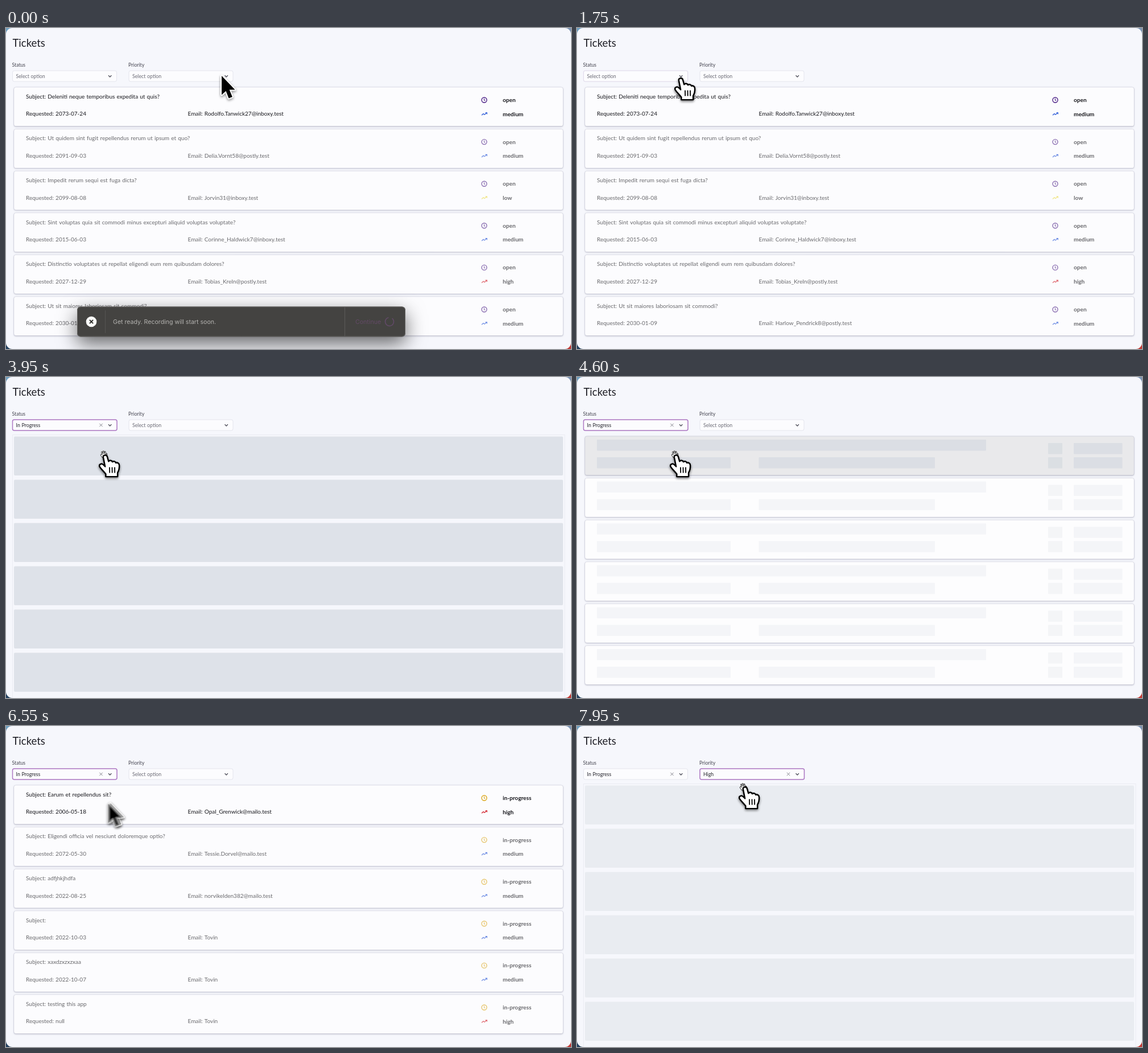
These frames come from a looping animation (993x564 px, 8000 ms). An HTML page with a canvas:

```html
<!DOCTYPE html>
<html lang="en">
<head>
<meta charset="utf-8">
<title>Tickets</title>
<style>
html, body { margin: 0; width: 100%; height: 100%; overflow: hidden; background: #f6f7fc; }
canvas { display: block; width: 993px; height: 564px; }
</style>
</head>
<body>
<canvas id="stage"></canvas>
<script>
const W = 993, H = 564, LOOP = 8000;
const canvas = document.getElementById('stage');
const ctx = canvas.getContext('2d');
const dpr = window.devicePixelRatio || 1;
canvas.width = W * dpr;
canvas.height = H * dpr;

const SANS = 'Lato, "Open Sans", sans-serif';
const COLORS = {
  open: '#4b1f86', 'in-progress': '#dba71c',
  low: '#ead94a', medium: '#2d5bd8', high: '#d2232e'
};
const OPEN_ROWS = [
  ['Deleniti neque temporibus expedita ut quis?', '2073-07-24', 'Rodolfo.Tanwick27@inboxy.test', 'open', 'medium'],
  ['Ut quidem sint fugit repellendus rerum ut ipsum et quo?', '2091-09-03', 'Delia.Vornt58@postly.test', 'open', 'medium'],
  ['Impedit rerum sequi est fuga dicta?', '2099-08-08', 'Jorvin31@inboxy.test', 'open', 'low'],
  ['Sint voluptas quia sit commodi minus excepturi aliquid voluptas voluptate?', '2015-06-03', 'Corinne_Haldwick7@inboxy.test', 'open', 'medium'],
  ['Distinctio voluptates ut repellat eligendi eum rem quibusdam dolores?', '2027-12-29', 'Tobias_Kreln@postly.test', 'open', 'high'],
  ['Ut sit maiores laboriosam sit commodi?', '2030-01-09', 'Harlow_Pendrick8@postly.test', 'open', 'medium']
];
const PROGRESS_ROWS = [
  ['Earum et repellendus sit?', '2006-05-18', 'Opal_Grenwick@mailo.test', 'in-progress', 'high'],
  ['Eligendi officia vel nesciunt doloremque optio?', '2072-05-30', 'Tessie.Dorvel@mailo.test', 'in-progress', 'medium'],
  ['adfjhkjhdfa', '2022-08-25', 'norvikelden382@mailo.test', 'in-progress', 'medium'],
  ['', '2022-10-03', 'Tovin', 'in-progress', 'medium'],
  ['xaxdzxzxzxaa', '2022-10-07', 'Tovin', 'in-progress', 'medium'],
  ['testing this app', 'null', 'Tovin', 'in-progress', 'high']
];

// Moments of the scene, in ms
const T = {
  focus1: 1740, menu1: 1850, pick1: 3430, load1: 3640, skeleton: 4450, data: 5200,
  focus2: 7030, menu2: 7090, pick2: 7640, load2: 7770
};
const MOVES = [
  [500, 1150, 182, 89], [2450, 2950, 174, 135], [3200, 3400, 174, 138],
  [6450, 6900, 387, 87], [7220, 7560, 295, 108]
];

const clamp = v => Math.max(0, Math.min(1, v));
const ramp = (t, from, to) => clamp((t - from) / (to - from));
const ease = p => p < .5 ? 4 * p ** 3 : 1 - (2 - 2 * p) ** 3 / 2;

function text(str, x, y, size, color, weight = 400, family = SANS) {
  ctx.font = `${weight} ${size}px ${family}`;
  ctx.wordSpacing = family === SANS ? size * .06 + 'px' : '0px';
  ctx.fillStyle = color;
  ctx.fillText(str, x, y);
}

function box(x, y, w, h, r, fill, stroke, width = 1) {
  ctx.beginPath();
  ctx.roundRect(x, y, w, h, r);
  if (fill) { ctx.fillStyle = fill; ctx.fill(); }
  if (stroke) { ctx.strokeStyle = stroke; ctx.lineWidth = width; ctx.stroke(); }
}

function line(points, color, width) {
  ctx.beginPath();
  points.forEach(([x, y]) => ctx.lineTo(x, y));
  ctx.strokeStyle = color;
  ctx.lineWidth = width;
  ctx.stroke();
}

function ring(x, y, r, color, width, from = 0, to = 2 * Math.PI) {
  ctx.beginPath();
  ctx.arc(x, y, r, from, to);
  ctx.strokeStyle = color;
  ctx.lineWidth = width;
  ctx.stroke();
}

function cross(x, y, r, color, width) {
  line([[x - r, y - r], [x + r, y + r]], color, width);
  line([[x + r, y - r], [x - r, y + r]], color, width);
}

function shadow(color, blur, dy, draw) {
  ctx.save();
  ctx.shadowColor = color;
  ctx.shadowBlur = blur * dpr;
  ctx.shadowOffsetY = dy * dpr;
  draw();
  ctx.restore();
}

function faded(alpha, draw) {
  ctx.save();
  ctx.globalAlpha *= alpha;
  draw();
  ctx.restore();
}

function backdrop() {
  [['#6f9fc0', 0, 0], ['#7d95b5', W - 14, 0], ['#24415f', 0, H - 14], ['#c23a35', W - 14, H - 14]]
    .forEach(([color, x, y]) => { ctx.fillStyle = color; ctx.fillRect(x, y, 14, 14); });
  box(0, 0, W, H, 11, '#f6f7fc');
  text('Tickets', 11.5, 33, 18.5, '#1d1d24');
}

function select(x, label, value, focus) {
  text(label, x - .5, 68, 8.7, '#44444f');
  box(x + .5, 75, 183, 19, 3, '#fcfcfe', '#e4e5ed');
  if (focus > 0) faded(focus, () => box(x + .5, 75, 183.5, 19, 3, null, '#ae78c4', 1.5));
  text(value || 'Select option', x + 6.5, 87.5, 8.75, value ? '#25252c' : '#6a6a74');
  if (value) cross(x + 156, 84.5, 2.7, '#777782', .9);
  line([[x + 169, 83.3], [x + 171.7, 86], [x + 174.4, 83.3]], '#50505c', 1.3);
}

function menu(x, items, hover, alpha) {
  faded(alpha, () => {
    shadow('rgba(20,20,50,.3)', 7, 2, () => box(x, 99, 188, 74, 3, '#fdfdfe'));
    items.forEach((item, i) => {
      const y = 99 + i * 24.5;
      if (i === 0) box(x, y, 188, 24, [3, 3, 0, 0], '#dcdce1');
      else if (i === hover) box(x, y, 188, 24, 0, '#e7e7ec');
      text(item, x + 7.5, y + 15.3, 8.75, '#25252c');
    });
  });
}

const rowY = i => 104 + 73.6 * i;

function card(y, fill = '#fcfcfe') {
  shadow('rgba(30,30,70,.28)', 2.5, .8, () => box(14, y, 965, 68.6, 3.5, fill));
  box(13.8, y, 965.4, 68.6, 3.5, null, 'rgba(90,90,130,.16)', .8);
}

function rowText([subject, date, email, status, priority], y) {
  const ink = '#17171c';
  text('Subject: ' + subject, 35, y + 19.7, 10, ink);
  text('Requested: ' + date, 35, y + 50.3, 10, ink);
  text('Email: ' + email, 319.5, y + 50.3, 10, ink);
  text(status, 873, y + 26, 10.1, ink, 700);
  text(priority, 873, y + 50.5, 10.1, ink, 700);
  ring(840.5, y + 22.5, 4.5, COLORS[status], 1.4);
  line([[840.4, y + 19.8], [840.4, y + 22.8], [842.2, y + 23.8]], COLORS[status], 1.1);
  const trend = COLORS[priority], c = y + 47;
  line([[836, c + 2.3], [838.9, c - .4], [841, c + 1.2], [845, c - 2]], trend, 1.3);
  line([[842.4, c - 2.2], [845.3, c - 2.2], [845.3, c + .6]], trend, 1.2);
}

function tickets(rows, alpha) {
  rows.forEach((row, i) => {
    card(rowY(i));
    faded(alpha * (i ? .64 : 1), () => rowText(row, rowY(i)));
  });
}

// Skeleton tint swings between two greys
function pulse(t, start) {
  const p = (1 - Math.cos(Math.PI * (t - start) / 800)) / 2;
  const mix = (a, b) => Math.round(a + (b - a) * p);
  return `rgba(${mix(237, 160)},${mix(240, 174)},${mix(243, 192)},.7)`;
}

function loadingBlocks(t, start) {
  box(11.5, 101.5, 970.5, 480, 0, null, '#e9e9f0', .8);
  for (let i = 0; i < 6; i++) box(14, 104.4 + 76 * i, 965, 68.6, 2, pulse(t, start));
}

function skeletonCards(t) {
  const tint = pulse(t, T.skeleton);
  for (let i = 0; i < 6; i++) {
    const y = rowY(i);
    card(y, i ? '#fdfdfe' : '#e9e9eb');
    faded(i ? .6 : 1, () => {
      [[35, 6, 684], [35, 37, 235], [319.5, 37, 309.5], [828, 12, 25], [873, 12, 85.5], [828, 37, 25], [873, 37, 85.5]]
        .forEach(([x, dy, w]) => box(x, y + dy, w, 19.5, 1, tint));
      if (!i) [[35, 6, 684], [35, 37, 235], [319.5, 37, 309.5], [828, 12, 25], [873, 12, 85.5], [828, 37, 25], [873, 37, 85.5]]
        .forEach(([x, dy, w]) => box(x, y + dy, w, 19.5, 1, 'rgba(120,130,140,.1)'));
    });
  }
}

function list(t) {
  if (t < T.load1) tickets(OPEN_ROWS, 1);
  else if (t < T.skeleton) loadingBlocks(t, T.load1);
  else if (t < T.data) skeletonCards(t);
  else if (t < T.load2) tickets(PROGRESS_ROWS, ramp(t, T.data, T.data + 250));
  else loadingBlocks(t, T.load2);
}

function toast(alpha) {
  if (alpha <= 0) return;
  faded(alpha, () => {
    shadow('rgba(0,0,0,.6)', 34, 12, () => box(125, 489.5, 577, 53, 6, '#444341'));
    box(125.5, 490, 576, 52, 6, '#444341', '#686765');
    ctx.beginPath();
    ctx.arc(150, 516, 9.3, 0, 7);
    ctx.fillStyle = '#fcfcfa';
    ctx.fill();
    cross(150, 516, 3.1, '#2a2a28', 1.9);
    line([[174.5, 496], [174.5, 536]], '#555452', 1);
    line([[595.5, 490], [595.5, 542]], '#5c5b59', 1);
    const ui = 'Inter, sans-serif';
    text('Get ready. Recording will start soon.', 188, 520, 10.6, '#b4b3b0', 400, ui);
    text('Continue', 614, 520, 10.6, '#634a66', 400, ui);
    ring(674, 516, 7.5, '#624a68', 1.6, -.9, 4.5);
  });
}

function cursorAt(t) {
  let x = 379, y = 84;
  for (const [from, to, tx, ty] of MOVES) {
    const p = ease(ramp(t, from, to));
    x += (tx - x) * p;
    y += (ty - y) * p;
  }
  return [x, y];
}

const ARROW = new Path2D('M0 0V33.5L7.5 26.7L12.5 39.5L18.8 37L13.6 24.6H23.5Z');
const HAND = new Path2D('M-3 3C-3.5-1 2.5-2 3.8 2L6.2 10.5C8 8 12 8.5 13 11.3C15 9.5 18.3 10.3 19 13C21.5 12 24.7 13.3 25 17C25.3 22 24.5 26 22 30V37H1.5V32.5C-2 28-6 24.5-9.3 19.5C-11 15.8-6.5 13-3 16.2L.3 19.5Z');

function paintCursor(hand, [x, y]) {
  ctx.save();
  ctx.translate(x, y);
  ctx.lineJoin = 'round';
  if (hand) {
    shadow('rgba(0,0,0,.45)', 4, 2, () => {
      ctx.strokeStyle = '#000';
      ctx.lineWidth = 2.6;
      ctx.stroke(HAND);
      ctx.fillStyle = '#fff';
      ctx.fill(HAND);
    });
    ctx.strokeStyle = '#000';
    ctx.lineWidth = 2.2;
    ctx.stroke(HAND);
    [8, 12.5, 17].forEach(lx => line([[lx, 20.5], [lx + .2, 30.5]], '#000', 1.8));
  } else {
    shadow('rgba(0,0,0,.45)', 4, 2, () => {
      ctx.strokeStyle = '#fff';
      ctx.lineWidth = 4;
      ctx.stroke(ARROW);
    });
    ctx.fillStyle = '#000';
    ctx.fill(ARROW);
  }
  ctx.restore();
}

function cursor(t) {
  const hand = t > 1000 && t < T.data || t > 6840;
  const moving = MOVES.some(([from, to]) => t > from && t < to);
  const samples = moving ? 6 : 1;
  // Averaging past positions gives motion blur
  for (let k = 0; k < samples; k++)
    faded(1 / (k + 1), () => paintCursor(hand, cursorAt(t - k * 4)));
}

function grabHand(x, y) {
  const palm = new Path2D('M-4.5 0L-6 2L-2.5 7H3.5L6 0L4.5-1L3.5 1L3-4L1.5-4.5L1 0L0-5L-1.7-5L-1.5 0L-3-4L-4.5-3.5L-3 2Z');
  ctx.save();
  ctx.translate(x, y);
  ctx.fillStyle = '#fff';
  ctx.fill(palm);
  ctx.strokeStyle = '#222';
  ctx.lineWidth = .9;
  ctx.stroke(palm);
  ctx.restore();
}

function draw(t) {
  ctx.setTransform(dpr, 0, 0, dpr, 0, 0);
  ctx.clearRect(0, 0, W, H);
  backdrop();
  list(t);
  select(11, 'Status', t >= T.pick1 ? 'In Progress' : '',
    ramp(t, T.focus1, T.focus1 + 120) - ramp(t, T.focus2, T.focus2 + 120));
  select(215.5, 'Priority', t >= T.pick2 ? 'High' : '', ramp(t, T.focus2, T.focus2 + 120));
  if (t >= T.menu1 && t < T.pick1)
    menu(11, ['Open', 'In Progress', 'Closed'], t > 2700 ? 1 : 0, ramp(t, T.menu1, T.menu1 + 100));
  if (t >= T.menu2 && t < T.pick2)
    menu(215.5, ['High', 'Medium', 'Low'], 0, ramp(t, T.menu2, T.menu2 + 100));
  toast(1 - ramp(t, 100, 400));
  if (t >= T.pick1 && t < T.data) grabHand(172, 135);
  if (t >= T.pick2) grabHand(292, 106);
  cursor(t);
}

function tick() {
  draw(performance.now() % LOOP);
  requestAnimationFrame(tick);
}
tick();
</script>
</body>
</html>
```
